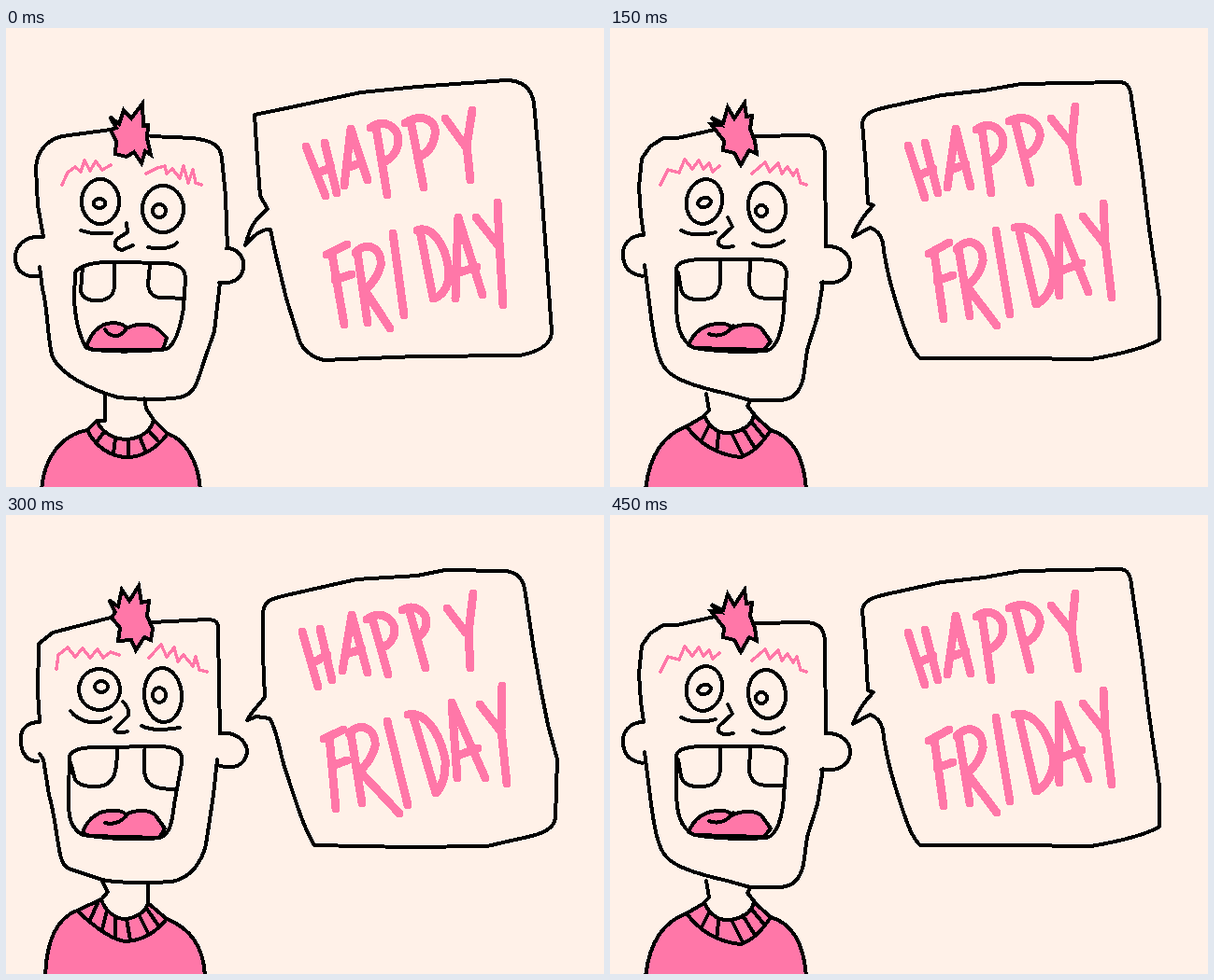
Recreate the animation shown at these times as an HTML page. Size 640 by 492 pixels, loop 0.48 s.

```html
<!DOCTYPE html>
<html lang="en">
<head>
<meta charset="utf-8">
<title>Happy Friday</title>
<style>
  :root { --paper: #fff1e8; --pink: #ff77a8; }
  html, body { margin: 0; width: 100%; height: 100%; overflow: hidden; background: var(--paper); }
  svg { display: block; width: 100vw; height: 100vh; }
  path, ellipse { fill: none; stroke: #000; stroke-width: 4; stroke-linecap: round; stroke-linejoin: round; }
  .fill { fill: var(--pink); }
  .hair { stroke-linejoin: miter; }
  .brow { stroke: var(--pink); stroke-width: 3.4; }
  .word { stroke: var(--pink); stroke-width: 9; }
  .pose { visibility: hidden; animation: .48s step-end infinite; }
  .one { animation-name: one; }
  .two { animation-name: two; }
  .three { animation-name: three; }
  @keyframes one { 0% { visibility: visible } 31.25%, 100% { visibility: hidden } }
  @keyframes two {
    0% { visibility: hidden } 31.25% { visibility: visible }
    62.5% { visibility: hidden } 93.75%, 100% { visibility: visible }
  }
  @keyframes three { 0% { visibility: hidden } 62.5% { visibility: visible } 93.75%, 100% { visibility: hidden } }
</style>
</head>
<body>
<svg viewBox="0 0 640 492" preserveAspectRatio="none" shape-rendering="crispEdges" role="img" aria-label="Happy Friday">

  <g class="pose one">
    <!-- sweater and neck -->
    <path class="fill" d="M38 496C40 460 60 436 87 431L97 421C104 436 118 441 130 441C146 439 155 432 158 420L173 435C190 440 206 462 208 496Z"/>
    <path d="M87 431C96 449 112 460 130 460C148 460 162 449 173 435M105 433L96 445M117 440L115 456M131 442L131 459M143 438L150 455M152 431L164 444M106 393V421L98 421M148 397L150 408L158 420"/>
    <!-- head and ears -->
    <path d="M40 224L34 190L32 150C33 132 44 120 60 116L112 109M155 116L200 118C222 121 230 126 231 140L235 180L237 236M229 273L223 325L211 360C204 384 200 393 186 396C165 399 140 398 120 396C92 388 60 373 50 353C44 335 45 300 39 280L36 256"/>
    <path d="M40 224C20 222 9 234 10 248C11 262 22 268 36 266M236 236C248 236 256 246 254 258C252 270 240 275 228 273"/>
    <path class="fill hair" d="M111 95L121 103L126 88L134 97L146 81L147 105L152 104L151 118L155 136L149 132L145 145L137 133L129 138L117 135L118 122L112 109L118 107Z"/>
    <path class="brow" d="M60 168L66 155L74 149L80 154L84 142L90 153L96 143L103 152L112 147M150 156L162 150L170 148L172 156L178 151L186 161L190 148L195 166L200 152L203 166L209 168"/>
    <!-- face -->
    <ellipse cx="101" cy="186" rx="20" ry="24"/><ellipse cx="100" cy="188" rx="6.5" ry="5"/>
    <ellipse cx="168" cy="194" rx="22" ry="25"/><ellipse cx="164" cy="196" rx="7" ry="7"/>
    <path d="M80 217L92 220H113M152 235C165 238 178 236 183 230M129 209L130 219L119 226C114 232 118 237 124 238L136 233"/>
    <path class="fill" d="M86 341C90 330 97 320 108 317C118 315 126 317 129 322C140 316 156 316 164 324L172 332L168 345H92Z"/>
    <path d="M106 323C110 331 122 334 129 322M74 262C80 253 100 250 120 251L170 252C186 253 192 258 192 270L190 300C186 325 180 340 172 344C140 348 100 347 86 343C78 330 74 310 73 290ZM82 256L80 282C82 290 90 293 102 292C112 290 116 285 116 275V252M154 254L152 275C153 286 160 290 170 289L191 290"/>
    <!-- bubble and lettering -->
    <path d="M266 93L300 86L380 69L440 63L535 56C552 56 562 64 565 80L572 160L578 240L584 325C584 340 570 347 550 351L440 352L340 356C325 352 318 345 314 335L300 290L288 240L283 216C275 215 265 222 256 233C260 220 262 208 280 194L272 180L269 140Z"/>
    <path class="word" d="M321 127L342 180M341 123L354 177M333 156L348 149M362 169L369 108L387 163M365 150L381 144M396 106L408 179M390 107C404 96 421 106 420 122C418 136 410 141 404 144M433 99L447 171M427 102C446 90 462 100 459 115C457 129 449 135 442 138M470 97L491 126M499 88L493 126L497 163"/>
    <path class="word" d="M349 243L362 318M343 243L365 232M352 270L370 264M376 240L387 316M374 241C388 226 403 238 401 255C397 269 390 276 384 281L411 322M414 220L426 308M443 217L457 289M440 217C456 210 472 235 474 262C474 280 465 288 457 290M481 290L484 203L510 286M485 262L504 256M503 203L526 232M526 187L528 230L532 297"/>
  </g>

  <g class="pose two">
    <path class="fill" d="M38 496C42 455 60 435 82 427L101 416C108 430 118 435 128 434C145 432 152 424 154 415L172 431C195 438 208 460 210 496Z"/>
    <path d="M82 427C95 445 115 458 140 460C155 455 165 442 172 431M106 426L99 440M116 432L115 450M130 434L142 458M142 429L155 450M151 422L166 440M103 392L106 410L100 416M150 400L147 405L155 415"/>
    <path d="M36 222L33 200L31 170L34 140L43 127L57 118H72L112 109M156 116L210 115C225 116 229 122 230 135L231 234M228 272L222 310L211 345L207 375C203 391 196 398 182 399L150 399L125 392C95 385 70 378 60 366C50 355 47 330 44 310L37 254"/>
    <path d="M36 222C22 222 12 232 14 246C16 260 24 264 35 266M233 234C246 234 258 242 257 256C255 270 242 275 226 273"/>
    <path class="fill hair" d="M108 96L121 102L126 85L133 97L144 80L146 95L152 94L150 108L155 121L157 135L149 131L140 147L133 134L121 131L122 121L108 103L117 104Z"/>
    <path class="brow" d="M54 168L62 152L74 155L80 141L88 151L95 142L100 151L106 145L110 154L117 148M152 156L166 144L171 154L180 145L184 156L190 149L196 158L200 152L204 166L210 168"/>
    <ellipse cx="101" cy="186" rx="19" ry="24" transform="rotate(12 101 186)"/><ellipse cx="101" cy="187" rx="7" ry="5" transform="rotate(-15 101 187)"/>
    <ellipse cx="168" cy="192" rx="20" ry="26" transform="rotate(-7 168 192)"/><ellipse cx="162" cy="196" rx="6" ry="6"/>
    <path d="M76 217C85 222 100 223 113 219M153 231C165 237 178 234 186 228M126 203L131 213L117 226C113 232 118 237 132 234"/>
    <path class="fill" d="M84 340C90 325 100 318 115 317C122 316 128 318 130 322C140 317 155 316 162 322L172 336L165 345L90 343Z"/>
    <path d="M106 328C116 332 126 328 132 319M71 258C72 250 85 249 95 248H150C175 248 188 250 189 262L186 300C185 325 178 343 168 346C140 348 110 346 90 343C75 335 71 320 71 295ZM73 262L76 280C78 290 90 292 100 291C112 290 118 284 118 270V250M150 250L149 275C152 290 160 291 186 290"/>
    <path d="M270 102C272 91 281 88 300 84L355 72L400 67L440 60L545 58C554 58 557 64 558 75L569 150L577 215L588 290V334C575 342 555 348 515 355L430 354H332C322 345 316 325 308 300C300 275 294 250 292 230C290 222 285 216 278 214L260 224C265 210 272 200 282 190L276 188L274 150Z"/>
    <path class="word" d="M319 126L337 182M337 123L351 177M331 158L346 151M361 171L370 108L386 170M365 152L381 146M398 108L408 177M392 109C405 98 422 108 421 124C419 136 412 141 406 144M433 98L450 166M427 100C446 90 462 104 460 117C457 130 450 134 443 138M472 97L492 122M498 84L494 123L501 165"/>
    <path class="word" d="M347 240L357 312M341 242L363 230M350 271L367 265M373 236L385 309M371 237C385 222 400 232 399 250C396 264 389 270 382 277L414 319M413 217L428 307M437 213L456 296M433 214C452 209 470 232 475 262C474 280 466 290 457 296M481 287L480 203L512 283M483 260L505 252M506 202L528 230M528 188L530 230L537 289"/>
  </g>

  <g class="pose three">
    <path class="fill" d="M42 496C43 455 55 432 76 424L102 412C106 425 118 434 130 433C142 430 150 424 152 416L172 433C195 442 212 460 213 496Z"/>
    <path d="M76 424C95 442 115 457 130 457C150 455 162 445 172 433M98 416L90 434M108 424L103 444M117 431L117 453M129 433L133 456M142 428L153 450M150 421L163 440M103 393L109 404L102 412M152 394V416"/>
    <path d="M36 222L34 190L35 138L50 126L112 110M156 115L215 112C226 112 228 116 227 125L229 234M226 262L222 300L214 353C210 371 198 389 178 393C150 395 115 394 103 391L70 380C62 378 60 372 58 364C54 345 52 320 46 300L40 262L36 256"/>
    <path d="M36 222C20 222 14 232 16 246C18 258 24 264 34 264M230 234C245 232 258 242 258 254C256 268 245 274 226 268"/>
    <path class="fill hair" d="M110 91L120 98L124 80L132 92L142 76L145 94L153 92L151 108L157 122L155 134L148 131L139 145L134 134L120 135L122 121L113 110L117 104Z"/>
    <path class="brow" d="M54 165L56 150L66 142L74 152L82 143L90 153L98 144L104 153L112 147L121 150M153 153L166 139L172 152L180 142L184 157L190 150L200 162L203 152L207 166L215 168"/>
    <ellipse cx="100" cy="187" rx="22" ry="22" transform="rotate(-15 100 187)"/><ellipse cx="102" cy="184" rx="7" ry="6"/>
    <ellipse cx="168" cy="193" rx="20" ry="29" transform="rotate(-4 168 193)"/><ellipse cx="164" cy="193" rx="7" ry="8"/>
    <path d="M69 210C80 224 100 226 112 217M145 226C158 232 170 230 186 228M125 200C130 204 133 212 130 216L116 230C118 234 124 234 130 232"/>
    <path class="fill" d="M82 341C85 330 95 318 110 317C120 316 126 318 128 321C140 315 155 316 160 322L170 336L164 346L90 344Z"/>
    <path d="M106 330C118 333 125 327 131 320M68 258C72 250 85 249 100 249L165 248C182 249 190 252 188 266L180 310C178 330 175 342 165 346C140 349 110 347 82 343C70 336 66 325 67 300ZM69 265L74 284C80 292 95 292 105 290C115 285 119 278 119 250M148 252V275C150 290 158 294 182 294"/>
    <path d="M275 105C276 92 283 90 300 86L375 69L440 65L470 59L535 60C548 62 554 68 556 85L565 145L572 185L580 225L590 262L588 325C586 340 565 344 545 348L515 355L430 356L330 354C318 335 308 300 298 270C292 250 290 230 282 218L268 216L258 220C262 212 272 202 277 195L275 150Z"/>
    <path class="word" d="M317 125L334 184M336 122L349 177M329 158L344 150M360 167L370 107L387 169M364 149L381 144M392 111L409 171M386 112C401 100 417 112 416 126C414 136 408 140 402 143M431 100L449 164M424 102C438 94 451 104 450 117C448 126 444 129 440 131M472 100L492 126M500 84L495 126L497 164"/>
    <path class="word" d="M346 237L353 315M340 240L361 230M349 269L365 263M369 234L381 309M367 234C380 220 397 230 395 248C391 262 385 269 378 274L421 320M408 221L430 311M435 213L460 298M430 214C448 210 464 232 470 262C471 282 466 292 460 298M483 282L477 201L513 282M483 258L505 250M507 203L528 230M531 183L530 230L536 288"/>
  </g>
</svg>
</body>
</html>
```
